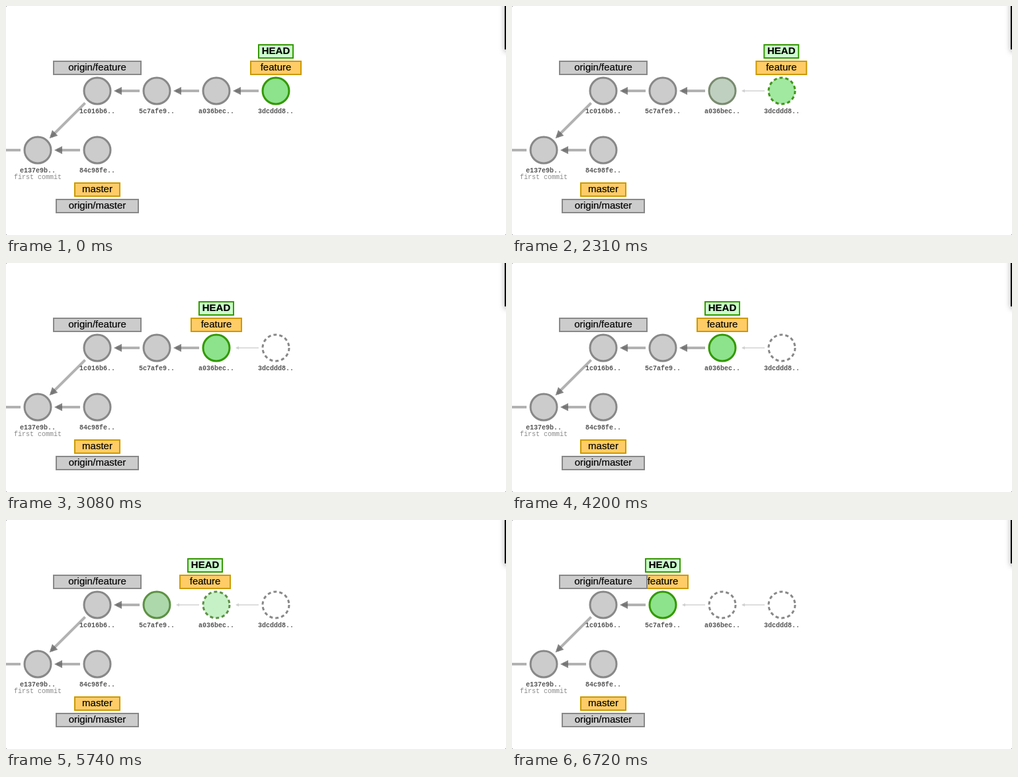
An HTML page that plays this animation: 756 by 348 pixels, repeating every 7070 ms.

```html
<!DOCTYPE html>
<html lang="en">
<head>
<meta charset="utf-8">
<title>Commit graph reset</title>
<style>
html, body { margin: 0; width: 100%; height: 100%; overflow: hidden; background: #fff; }
svg { display: block; overflow: hidden; }
circle { fill: #ccc; stroke: #888; stroke-width: 3; }
.line { stroke: #666; stroke-opacity: .5; stroke-width: 4; }
.tip { fill: #666; fill-opacity: .8; }
.faint .line { stroke: #ddd; stroke-opacity: 1; stroke-width: 2; }
.faint .tip { fill: #d0d0d0; fill-opacity: 1; }
text { text-anchor: middle; }
.hash, .note { font: bold 10px "Liberation Mono", "Courier New", monospace; fill: #555; }
.note { font-weight: normal; fill: #888; }
.tag text { font: 15px "Liberation Sans", Arial, sans-serif; stroke: #000; stroke-width: .2; }
.tag rect { stroke-width: 2; fill: #fc6; stroke: #c90; }
.remote rect { fill: #ccc; stroke: #888; }
.head rect { fill: #cfc; stroke: #390; }
.head text { font-weight: bold; }
#edge { filter: drop-shadow(0 3px 4px rgba(0, 0, 0, .35)); }
</style>
</head>
<body>
<svg id="stage" width="756" height="348">
  <rect id="edge" x="754" y="-20" width="20" height="86"/>
</svg>
<script>
const LOOP = 7070, STEP = 70, GAP = 90;
const GREY = [[204, 204, 204], [136, 136, 136]];
const GREEN = [[140, 227, 140], [51, 153, 0]];
const EMPTY = [[255, 255, 255], [136, 136, 136]];
const stage = document.getElementById('stage');

function add(parent, name, attrs, text) {
  const el = document.createElementNS('http://www.w3.org/2000/svg', name);
  for (const key in attrs) el.setAttribute(key, attrs[key]);
  if (text) el.textContent = text;
  return parent.appendChild(el);
}

function commit(x, y, hash, note) {
  const dot = add(stage, 'circle', { cx: x, cy: y, r: 20 });
  add(stage, 'text', { x, y: y + 34, class: 'hash' }, hash + '..');
  if (note) add(stage, 'text', { x, y: y + 44, class: 'note' }, note);
  return dot;
}

// Pointer towards the commit at (x, y), drawn along +x and then rotated
function arrow(x, y, length, angle = 0, faint = false) {
  const g = add(stage, 'g', { transform: `translate(${x} ${y}) rotate(${angle})`, class: faint ? 'faint' : '' });
  const tip = faint ? 29 : 25, size = faint ? 5 : 12;
  add(g, 'line', { x1: tip + size / 3, x2: length - 26, class: 'line' });
  add(g, 'path', { d: `M${tip} 0l${size} ${-size / 2}v${size}z`, class: 'tip' });
  return g;
}

// Label box sized by the number of letters
function tag(x, y, name, kind = '') {
  const width = 20 + 8 * name.length;
  const g = add(stage, 'g', { class: 'tag ' + kind, transform: `translate(${x} ${y})` });
  add(g, 'rect', { x: -width / 2, width, height: 20 });
  add(g, 'text', { y: 14 }, name);
  return g;
}

commit(48, 219, 'e137e9b', 'first commit');
commit(138, 219, '84c98fe');
commit(138, 129, '1c016b6');
const dots = [commit(408, 129, '3dcddd8'), commit(318, 129, 'a036bec'), commit(228, 129, '5c7afe9')];

add(stage, 'line', { x1: 0, x2: 22, y1: 219, y2: 219, class: 'line' });
arrow(48, 219, GAP);
arrow(48, 219, GAP * Math.SQRT2, -45);
arrow(138, 129, GAP);
const solid = [arrow(318, 129, GAP), arrow(228, 129, GAP)];
const faint = [arrow(318, 129, GAP, 0, true), arrow(228, 129, GAP, 0, true)];

const feature = tag(408, 84, 'feature');
tag(138, 84, 'origin/feature', 'remote');
tag(138, 269, 'master');
tag(138, 294, 'origin/master', 'remote');
const head = tag(408, 59, 'HEAD', 'head');

// Rounded window corners
for (const [x, y] of [[0, 0], [0, 347], [755, 347]])
  add(stage, 'rect', { x, y, width: 1, height: 1, fill: '#888' });

const clamp = v => Math.max(0, Math.min(1, v));
const cubicInOut = p => p < .5 ? 4 * p ** 3 : 1 - 4 * (1 - p) ** 3;

function paint(dot, from, to, k) {
  ['fill', 'stroke'].forEach((prop, i) => {
    dot.style[prop] = `rgb(${from[i].map((c, j) => Math.round(c + (to[i][j] - c) * k))})`;
  });
}

const moves = [{ start: 2310, rate: .128 }, { start: 5600, rate: .1175 }];

function draw() {
  const t = performance.now() % LOOP;
  let x = 408;
  const fades = moves.map(({ start, rate }, i) => {
    const n = Math.floor((t - start) / STEP);
    const begun = n >= 0;
    if (begun) x -= GAP * (n >= 7 ? 1 : cubicInOut(clamp(.126 + rate * n)));
    solid[i].style.display = begun ? 'none' : '';
    faint[i].style.display = begun ? '' : 'none';
    dots[i].style.strokeDasharray = begun ? '5 4' : 'none';
    return begun ? 1 - (1 - clamp((n + 1) / 8)) ** 1.5 : 0;
  });
  paint(dots[0], GREEN, EMPTY, fades[0]);
  if (fades[1] > 0) paint(dots[1], GREEN, EMPTY, fades[1]);
  else paint(dots[1], GREY, GREEN, fades[0]);
  paint(dots[2], GREY, GREEN, fades[1]);
  feature.setAttribute('transform', `translate(${x} 84)`);
  head.setAttribute('transform', `translate(${x} 59)`);
  requestAnimationFrame(draw);
}
draw();
</script>
</body>
</html>
```
